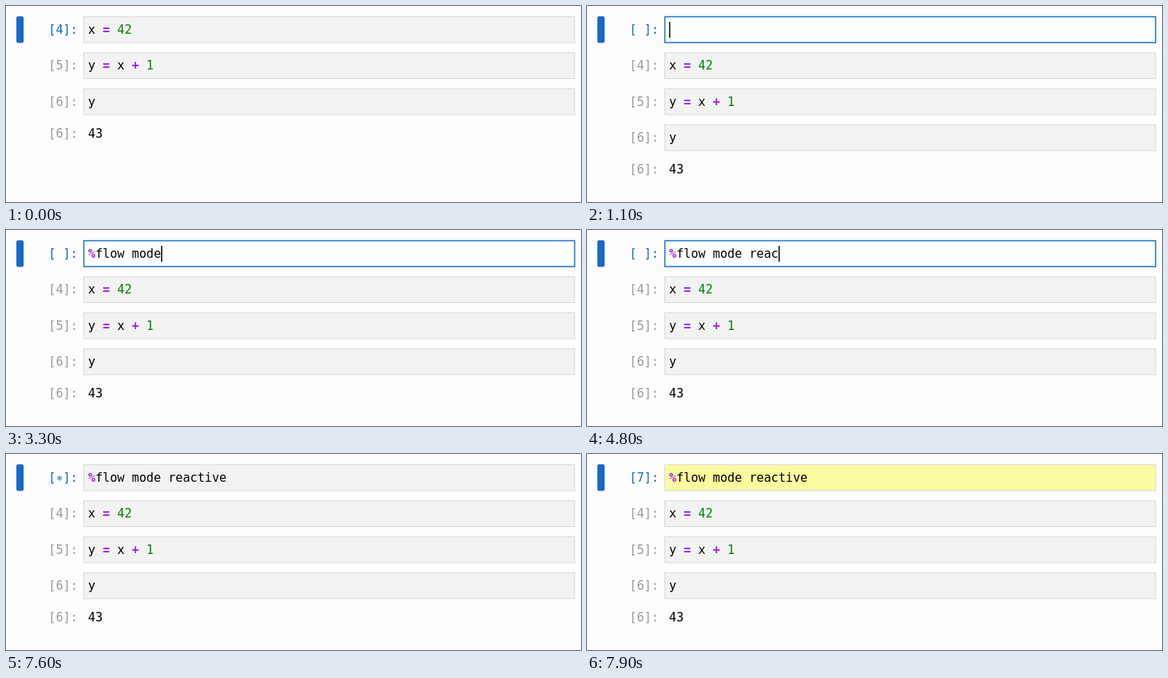
Animation, 720 px wide and 247 px high, one loop 8 s. Source, as an HTML page:

```html
<!DOCTYPE html>
<html lang="en">
<head>
<meta charset="utf-8">
<title>Notebook cells</title>
<style>
html, body { margin: 0; width: 100%; height: 100%; overflow: hidden; background: #fdfcfe; }
svg { display: block; width: 100%; height: 100%; }
text { font: 15.17px "DejaVu Sans Mono", monospace; fill: #000; white-space: pre; }
.prompt { fill: #999; }
.active { fill: #1668b8; }
.op { fill: #a020f0; font-weight: bold; }
.num { fill: #008000; }
.box { fill: #f2f2f2; stroke: #d9d9da; stroke-width: 1; }
</style>
</head>
<body>
<svg id="stage" viewBox="0 0 720 247"></svg>
<script>
const LOOP = 8000, ADV = 9.133, LEFT = 102.8, PITCH = 45.4;
const INSERT = 400, EDIT = 1000, RUN = 7600, DONE = 7800;
const COMMAND = "%flow mode reactive";
// Time at which each character of the command appears
const KEYS = [1800, 2000, 2100, 2300, 2400, 2500, 2700, 2800, 3000, 3200,
  3500, 3800, 4000, 4200, 4600, 4900, 5000, 5200, 5300];
const BLINKS = [[1600, 1800], [5800, 6200], [6700, 7200]];
const stage = document.getElementById("stage");

function add(parent, tag, attrs, content = "") {
  const node = document.createElementNS("http://www.w3.org/2000/svg", tag);
  for (const key in attrs) node.setAttribute(key, attrs[key]);
  node.textContent = content;
  return parent.appendChild(node);
}

function set(node, attrs) {
  for (const key in attrs) node.setAttribute(key, attrs[key]);
}

const kind = s => /[=+%]/.test(s) ? "op" : /\d/.test(s) ? "num" : "name";

function addCell(parent, y, label, code) {
  const g = add(parent, "g", { transform: `translate(0 ${y})` });
  const box = add(g, "rect", { class: "box", x: 97.5, y: 13.5, width: 614.5, height: 32.6 });
  const prompt = add(g, "text", { class: "prompt", x: 53.3, y: 35 }, label);
  for (const m of code.matchAll(/\S+/g))
    add(g, "text", { class: kind(m[0]), x: LEFT + m.index * ADV, y: 35 }, m[0]);
  return { g, box, prompt };
}

add(stage, "rect", { width: 720, height: 247, fill: "#fdfcfe" });
const list = add(stage, "g", {});
const cells = [["[4]:", "x = 42"], ["[5]:", "y = x + 1"], ["[6]:", "y"]]
  .map(([label, code], i) => addCell(list, i * PITCH, label, code));
add(list, "text", { class: "prompt", x: 53.3, y: 165.5 }, "[6]:");
add(list, "text", { x: LEFT, y: 165.5 }, "43");

const fresh = addCell(stage, 0, "[ ]:", "");
fresh.prompt.setAttribute("class", "active");
const percent = add(fresh.g, "text", { class: "op", x: LEFT, y: 35 });
const typed = add(fresh.g, "text", { x: LEFT + ADV, y: 35 });
const caret = add(fresh.g, "rect", { y: 20, width: 1.5, height: 20, fill: "#000" });
add(stage, "rect", { x: 13, y: 13, width: 9, height: 33.5, rx: 2, fill: "#1769c4" });

function draw(t) {
  const inserted = t >= INSERT, editing = t >= EDIT && t < RUN;
  const count = KEYS.filter(k => t >= k).length;
  list.setAttribute("transform", `translate(0 ${inserted ? PITCH : 0})`);
  cells[0].prompt.setAttribute("class", inserted ? "prompt" : "active");
  fresh.g.setAttribute("visibility", inserted ? "visible" : "hidden");
  fresh.prompt.textContent = t >= DONE ? "[7]:" : t >= RUN ? "[\u2217]:" : "[ ]:";
  fresh.box.style.fill = editing ? "#fff" : t >= DONE ? "#fafaa0" : "";
  fresh.box.style.stroke = editing ? "#1d76c6" : "";
  fresh.box.style.strokeWidth = editing ? 1.5 : "";
  percent.textContent = COMMAND.slice(0, Math.min(count, 1));
  typed.textContent = COMMAND.slice(1, Math.max(count, 1));
  const lit = editing && !BLINKS.some(([off, on]) => t >= off && t < on);
  set(caret, { x: 102.8 + count * ADV, opacity: lit ? 1 : 0 });
}

const start = performance.now();
function tick() {
  draw((performance.now() - start) % LOOP);
  requestAnimationFrame(tick);
}
draw(0);
requestAnimationFrame(tick);
</script>
</body>
</html>
```
